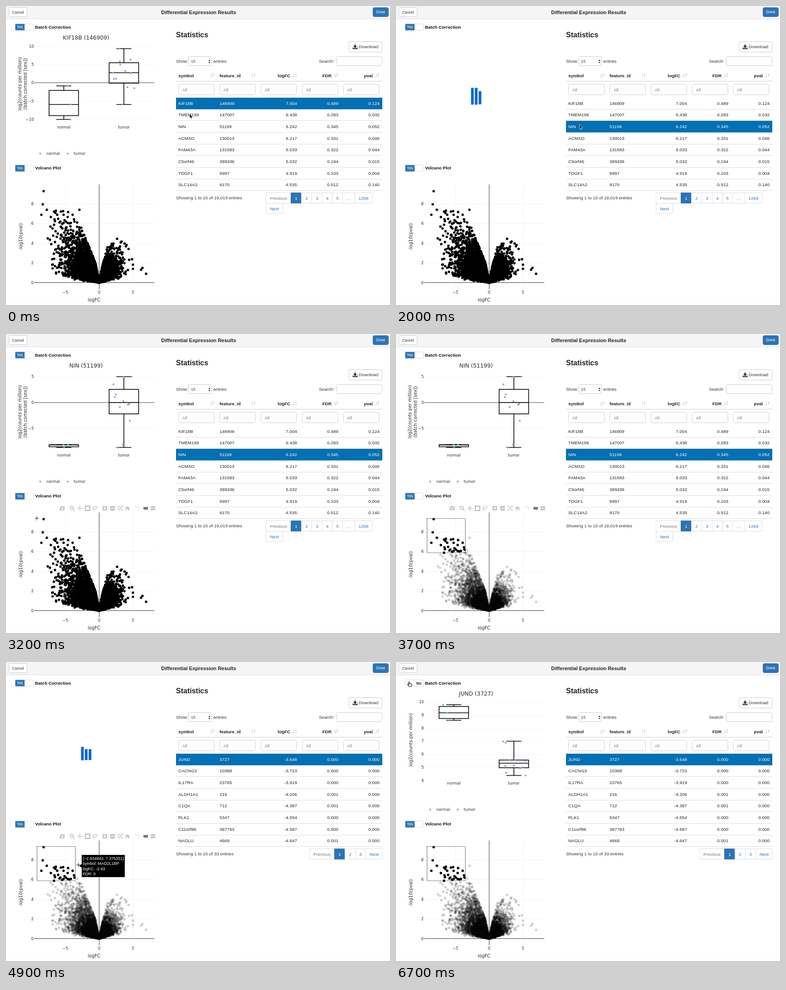
Animation, 847 px wide and 661 px high, one loop 7300 ms. Source, as an HTML page with a canvas:

```html
<!DOCTYPE html>
<html lang="en">
<head>
<meta charset="utf-8">
<title>Differential Expression Results</title>
<style>
html, body { margin: 0; width: 100%; height: 100%; overflow: hidden; background: #fff; }
canvas { display: block; }
</style>
</head>
<body>
<canvas id="stage" width="847" height="661"></canvas>
<script>
const LOOP = 7300, STEP = 100;
const UI = '"Liberation Sans", Arial, sans-serif', CHART = '"DejaVu Sans", Verdana, sans-serif';
const BLUE = '#2d74b5', GREEN = '#66c2a5', PURPLE = '#8da0cb', INK = '#333';
const stage = document.getElementById('stage');
let c = stage.getContext('2d');

// ---- drawing helpers; text is centred vertically on y
function text(s, x, y, size, { color = INK, align = 'left', bold = false, font = UI } = {}) {
  c.font = `${bold ? 'bold ' : ''}${size}px ${font}`;
  c.fillStyle = color;
  c.textAlign = align;
  c.fillText(s, x, y + size * 0.36);
}
const chart = (s, x, y, size = 8.5, align = 'center') =>
  text(s, x, y, size, { color: '#2a2a2a', align, font: CHART });
function upright(s, x, y) {
  c.save();
  c.translate(x, y);
  c.rotate(-Math.PI / 2);
  chart(s, 0, 0, 9.9);
  c.restore();
}
function rect(x, y, w, h, color) { c.fillStyle = color; c.fillRect(x, y, w, h); }
function line(points, color = '#000', width = 1) {
  c.strokeStyle = color;
  c.lineWidth = width;
  c.beginPath();
  points.forEach(([x, y]) => c.lineTo(x, y));
  c.stroke();
}
function shape(points, color) {
  c.fillStyle = color;
  c.beginPath();
  points.forEach(([x, y]) => c.lineTo(x, y));
  c.fill();
}
function dot(x, y, r, color) {
  c.fillStyle = color;
  c.beginPath();
  c.arc(x, y, r, 0, 7);
  c.fill();
}
function frame(x, y, w, h, { fill = '#fff', border = '#ccc', radius = 3 } = {}) {
  c.beginPath();
  c.roundRect(x + 0.5, y + 0.5, w - 1, h - 1, radius);
  c.fillStyle = fill;
  c.fill();
  c.strokeStyle = border;
  c.lineWidth = 1;
  c.stroke();
}
const pairs = a => a.flatMap((v, i) => i % 2 ? [] : [[v, a[i + 1]]]);

// ---- volcano points
let seed = 7;
const rnd = () => (seed = seed * 16807 % 2147483647) / 2147483647;
const gauss = () => Math.sqrt(-2 * Math.log(rnd())) * Math.cos(6.2832 * rnd());
function lobe(n, side, mean, top, spread, lean) {
  const out = [];
  while (out.length < n) {
    const h = -Math.log(rnd()) * mean;
    const fc = 0.27 * h + Math.abs(gauss()) * spread * (1 - Math.exp(-h / 0.45)) + Math.max(0, h - 2) * lean;
    if (h < top && fc < 7.2) out.push([205.5 + side * fc * 14.9, 609.5 - h * 21.7]);
  }
  return out;
}
const picks = pairs([83, 408, 81, 437, 78, 460, 90, 449, 99, 465, 106, 453, 110, 451, 109, 456, 121, 453,
  126, 452, 137, 454, 113, 460, 127, 460, 147, 460, 136, 465, 129, 472, 115, 469, 107, 470, 108, 474,
  106, 482, 118, 477, 124, 480, 120, 475, 127, 478, 132, 475, 136, 478, 140, 479, 143, 478, 150, 470, 151, 475]);
const strays = pairs([162, 449, 157, 477, 92, 512, 98, 486, 97, 515, 102, 558, 102, 570, 108, 520, 104, 506,
  309, 590, 301, 577, 298, 581, 278, 558, 280, 570, 280, 579, 245, 513, 255, 519, 253, 521, 236, 524]);
const cloud = [...lobe(3600, -1, 1.25, 5.8, 2.05, 0.3), ...lobe(2800, 1, 0.72, 4.1, 1.3, 0.15), ...strays];
function layer(points, color) {
  const sheet = document.createElement('canvas'), main = c;
  sheet.width = 847;
  sheet.height = 661;
  c = sheet.getContext('2d');
  points.forEach(([x, y]) => dot(x, y, 2.7, color));
  c = main;
  return sheet;
}
const solid = layer([...cloud, ...picks], '#000'), faded = layer([...cloud, ...picks], 'rgba(0,0,0,.19)');

// ---- box plots: ticks [first value, step, first y, spacing, count]; boxes [max, q3, median, q1, min]
const plots = {
  kif: { title: 'KIF18B (146909)', ticks: [10, -5, 88.5, 40.4, 5], zero: 169, labelX: [30, 42],
    normal: [176, 186, 217, 241.5, 250], tumor: [94, 125, 147, 170, 217],
    green: [136, 176, 142, 217, 142, 250],
    purple: [249.5, 94, 251, 122, 275, 118, 252, 129, 263, 143, 236, 147, 275, 148, 238, 161, 243, 160,
      268, 179, 283, 181, 256, 217] },
  nin: { title: 'NIN (51199)', ticks: [5, -5, 94, 57, 3], zero: 151, labelX: [30, 42],
    normal: [243.5, 244, 244.5, 248.5, 250], tumor: [94, 122, 151, 176, 250],
    green: [127, 244, 137, 244, 128, 250],
    purple: [259, 95, 277, 94, 237, 111, 242, 133, 240, 139, 259, 148, 272, 154, 269, 156, 251, 161,
      273, 191, 258, 244, 247, 250] },
  jund: { title: 'JUND (3727)', ticks: [10, -1, 91.5, 28.9, 6], labelX: [32, 44],
    normal: [94, 98, 112, 132, 138], tumor: [184, 216, 223, 242, 250],
    green: [130, 94, 108, 112, 141, 138],
    purple: [253, 184, 283, 188, 235, 216, 251, 217, 276, 216, 282, 216, 244, 228, 234, 239, 241, 244,
      252, 243, 281, 240, 268, 250] },
  raw: { title: 'JUND (3727)', ticks: [10, -1, 88, 28.8, 7], labelX: [32],
    normal: [94, 98, 112, 124.5, 128.5], tumor: [174.5, 216, 223, 233, 250],
    green: [104, 94, 113, 112, 118, 129],
    purple: [236, 175, 242, 178, 250, 216, 262, 216, 285, 218, 241, 229, 260, 228, 279, 232, 274, 234,
      243, 244, 286, 250] }
};
function box(x, [max, q3, med, q1, min]) {
  c.strokeStyle = '#000';
  c.lineWidth = 1.6;
  c.strokeRect(x - 32.5, q3, 65, q1 - q3);
  line([[x - 32.5, med], [x + 32.5, med]], '#000', 1.6);
  [[max, q3], [min, q1]].forEach(([tip, edge]) => {
    line([[x - 16.5, tip], [x + 16.5, tip]], '#000', 1.6);
    line([[x, tip], [x, edge]], '#000', 1.6);
  });
}
function boxPlot(p) {
  const [first, step, y0, gap, count] = p.ticks;
  for (let i = 0; i < count; i++) {
    const y = y0 + i * gap;
    if (y < 255) line([[62, Math.round(y) + 0.5], [327, Math.round(y) + 0.5]], '#f6f6f6');
    chart(String(first + i * step).replace('-', '−'), 61.5, y, 8.5, 'right');
  }
  if (p.zero) line([[62, p.zero], [327, p.zero]], '#444');
  chart(p.title, 176.5, 70, 12.2);
  upright('log2(counts per million)', p.labelX[0], 171.5);
  if (p.labelX[1]) upright('(batch corrected [sex])', p.labelX[1], 171.5);
  box(127.5, p.normal);
  box(260, p.tumor);
  pairs(p.green).forEach(([x, y]) => dot(x, y, 2.1, GREEN));
  pairs(p.purple).forEach(([x, y]) => dot(x, y, 2.1, PURPLE));
  chart('normal', 127.5, 267);
  chart('tumor', 260, 267);
  dot(75.5, 325, 2.1, GREEN);
  dot(136, 325, 2.1, PURPLE);
  chart('normal', 89, 325, 8.5, 'left');
  chart('tumor', 149.5, 325, 8.5, 'left');
}

// three pulsing bars, each trailing the one before it
function loader(x, y, t, phase) {
  for (let i = 0; i < 3; i++) {
    const p = (t / 1000 + phase + 1 - i * 0.16) % 1;
    const k = p < 0.8 ? (1 - Math.cos(p / 0.8 * 2 * Math.PI)) / 2 : 0;
    rect(x + i * 8.4, y - 13 * k, 6, 24 + 14.5 * k, '#0a68d8');
  }
}

// ---- page furniture
function toggle(y, on) {
  frame(20, y, 41, 15, { border: '#ddd', radius: 2 });
  if (on) {
    rect(20.5, y + 0.5, 20.5, 14, BLUE);
    text('Yes', 30.7, y + 7.5, 8.2, { color: '#fff', align: 'center' });
  } else text('No', 50.5, y + 7.5, 8.6, { align: 'center', color: '#222', bold: true });
}
function page(on) {
  rect(0, 0, 847, 661, '#fff');
  rect(0, 0, 847, 28, '#f5f5f5');
  rect(0, 28, 847, 1, '#ddd');
  rect(0, 660, 847, 1, '#888');
  frame(6, 3, 41, 21);
  text('Cancel', 26.5, 13.5, 8.4, { align: 'center' });
  frame(809, 3, 35, 21, { fill: BLUE, border: '#2a6ba6' });
  text('Done', 826.5, 13.5, 8.2, { color: '#fff', align: 'center' });
  text('Differential Expression Results', 425, 13.5, 11.2, { bold: true, align: 'center', color: '#222' });
  toggle(39, on);
  toggle(350, true);
  text('Batch Correction', 64, 46.5, 9.75, { bold: true, color: '#111' });
  text('Volcano Plot', 64, 356.5, 9.6, { bold: true, color: '#111' });
  text('Statistics', 375, 63, 16, { bold: true, color: '#222' });
  frame(756, 78, 74, 24);
  rect(768.5, 85, 3, 4, INK);
  shape([[765.5, 88.5], [774.5, 88.5], [770, 93]], INK);
  line([[765.5, 91.5], [765.5, 94], [774.5, 94], [774.5, 91.5]], INK, 1.8);
  text('Download', 778, 90, 9.7);
}

// ---- table
const columns = [['symbol', 380, 0], ['feature_id', 471, 0], ['logFC', 642, 1], ['FDR', 733, 1], ['pval', 824, 1]];
const allGenes = `KIF18B 146909 7.004 0.489 0.124
TMEM199 147007 6.438 0.283 0.032
NIN 51199 6.242 0.345 0.052
ACMSD 130013 6.217 0.331 0.046
FAM43A 131583 5.033 0.322 0.044
C5orf46 389336 5.032 0.194 0.015
TDGF1 6997 4.919 0.103 0.004
SLC14A2 8170 4.535 0.512 0.140`;
const pickedGenes = `JUND 3727 -3.648 0.000 0.000
CACNG3 10368 -3.723 0.000 0.000
IL17RA 23765 -3.919 0.000 0.000
ALDH1A1 216 -4.206 0.001 0.000
C1QA 712 -4.387 0.001 0.000
PLK1 5347 -4.554 0.000 0.000
C11orf96 387763 -4.587 0.000 0.000
NAGLU 4669 -4.647 0.001 0.000`;
function pager(x, y, cells) {
  cells.forEach(([label, w]) => {
    const active = label === '1', muted = label === 'Previous' || label === '…';
    frame(x, y, w + 1, 24, { fill: active ? BLUE : '#fff', border: active ? BLUE : '#ddd', radius: 0 });
    text(label, x + w / 2 + 0.5, y + 12, 9.8, { align: 'center', color: active ? '#fff' : muted ? '#777' : BLUE });
    x += w;
  });
}
function sortIcon(x) {
  line([[x - 2.5, 149], [x - 2.5, 157]], '#ccc');
  line([[x - 4.5, 154.5], [x - 2.5, 157], [x - 0.5, 154.5]], '#ccc');
  line([[x + 2.5, 149], [x + 2.5, 157]], '#ccc');
  line([[x + 0.5, 151.5], [x + 2.5, 149], [x + 4.5, 151.5]], '#ccc');
}
function table(rows, selected, picked) {
  text('Show', 375, 121.5, 9.8);
  frame(402, 111, 52, 21);
  text('15', 408, 122, 8.8);
  shape([[446.5, 121], [451, 121], [448.75, 118]], INK);
  shape([[446.5, 123], [451, 123], [448.75, 126]], INK);
  text('entries', 457, 121.5, 9.8);
  text('Search:', 724, 121.5, 9.8, { align: 'right' });
  frame(728, 111, 102, 21);
  columns.forEach(([name, x, right], i) => {
    text(name, right ? x - 15 : x, 153, 9.8, { bold: true, align: right ? 'right' : 'left', color: '#222' });
    sortIcon(455 + i * 91);
    frame(380 + i * 90.9, 172, 80, 24);
    text('All', 389 + i * 90.9, 184.5, 9.4, { color: '#777' });
  });
  rect(375, 165, 455, 1.5, '#ddd');
  rows.split('\n').forEach((row, r) => {
    const y = 214.3 + r * 25.65, on = r === selected;
    rect(375, Math.round(y + 12.4), 455, 1, '#ddd');
    if (on) rect(375, Math.round(y - 12.6), 455, 25.5, '#0270b2');
    row.split(' ').forEach((cell, i) => {
      const [, x, right] = columns[i];
      text(cell, x, y, 9.85, { align: right ? 'right' : 'left', color: on ? '#fff' : '#222' });
    });
  });
  text(`Showing 1 to 15 of ${picked ? '33' : '19,019'} entries`, 375, 422.5, 9.8);
  if (picked) pager(669, 411, [['Previous', 55], ['1', 23], ['2', 23], ['3', 23], ['Next', 37]]);
  else {
    pager(573, 411, [['Previous', 55], ['1', 23], ['2', 23], ['3', 23], ['4', 22.5], ['5', 22.5], ['…', 27], ['1268', 38]]);
    pager(573, 434, [['Next', 37]]);
  }
}

// ---- volcano plot, with an optional selection [right, bottom]
function volcano(sel) {
  [131, 280].forEach(x => line([[x + 0.5, 393], [x + 0.5, 622]], '#f3f3f3'));
  [436, 479, 523, 566].forEach(y => line([[62, y + 0.5], [327, y + 0.5]], '#f3f3f3'));
  line([[205.5, 393], [205.5, 624]], '#333');
  line([[62, 609.5], [327, 609.5]], '#333');
  c.drawImage(sel ? faded : solid, 0, 0);
  if (sel) {
    picks.filter(([x, y]) => x <= sel[0] && y <= sel[1]).forEach(([x, y]) => dot(x, y, 2.7, '#000'));
    c.setLineDash([1.5, 1.5]);
    c.lineWidth = 1.2;
    c.strokeStyle = '#000';
    c.strokeRect(68.5, 406.5, sel[0] - 68.5, sel[1] - 406.5);
    c.setLineDash([]);
  }
  [0, 2, 4, 6, 8].forEach(v => chart(v, 61, 609.5 - v * 21.7, 8.5, 'right'));
  [['−5', 131], ['0', 205.5], ['5', 280]].forEach(([s, x]) => chart(s, x, 631));
  chart('logFC', 194, 647, 9.9);
  upright('-log10(pval)', 32, 508.5);
}

function modebar(y) {
  const g = '#c6c6c6', d = '#777';
  rect(118.5, y - 3.5, 11, 8, g);
  rect(121.5, y - 5, 5, 2, g);
  dot(124, y + 0.5, 2.4, '#fff');
  dot(124, y + 0.5, 1.2, g);
  c.strokeStyle = g;
  c.lineWidth = 1.8;
  c.beginPath();
  c.arc(145, y - 1, 3.7, 0, 7);
  c.stroke();
  line([[147.5, y + 1.5], [151.5, y + 5.5]], g, 2);
  line([[143, y - 1], [147, y - 1]], g);
  line([[158, y], [168, y]], g, 1.3);
  line([[163, y - 5], [163, y + 5]], g, 1.3);
  [0, 1, 2, 3].forEach(i => {
    c.save();
    c.translate(163, y);
    c.rotate(i * Math.PI / 2);
    shape([[-2, -3.5], [2, -3.5], [0, -6]], g);
    c.restore();
  });
  c.strokeStyle = d;
  c.lineWidth = 1.7;
  c.setLineDash([2, 1.2]);
  c.strokeRect(174.8, y - 4.7, 10, 9.5);
  c.setLineDash([]);
  c.strokeStyle = g;
  c.lineWidth = 1.4;
  c.beginPath();
  c.ellipse(196.5, y - 1.5, 4.8, 3, -0.2, 0, 7);
  c.stroke();
  line([[193, y + 1], [194, y + 3], [192, y + 5]], g, 1.4);
  [218, 235].forEach(x => {
    rect(x - 5, y - 5, 10, 10, g);
    line([[x - 3, y], [x + 3, y]], '#fff', 1.6);
  });
  line([[218, y - 3], [218, y + 3]], '#fff', 1.6);
  line([[248, y - 4], [256, y + 4]], g, 1.2);
  line([[248, y + 4], [256, y - 4]], g, 1.2);
  [-1, 1].forEach(a => [-1, 1].forEach(b =>
    line([[252 + a * 2, y + b * 5], [252 + a * 5, y + b * 5], [252 + a * 5, y + b * 2]], g, 1.2)));
  shape([[262.5, y], [268, y - 5], [273.5, y], [272, y], [272, y + 4.5], [269.5, y + 4.5], [269.5, y + 1],
    [266.5, y + 1], [266.5, y + 4.5], [264, y + 4.5], [264, y]], g);
  c.setLineDash([1.5, 1.5]);
  line([[285, y - 3.5], [292, y - 3.5], [292, y + 5]], g, 1.4);
  c.setLineDash([]);
  shape([[302, y], [305, y - 3], [313, y - 3], [313, y + 3], [305, y + 3]], d);
  [-2.5, 2.5].forEach(k => shape([[318, y + k], [320, y + k - 2], [329, y + k - 2], [329, y + k + 2], [320, y + k + 2]], g));
}

// ---- tooltips
function pointTip(x, y, tipX, tipY, lines) {
  rect(x, y, 95, 49, '#000');
  shape([[tipX, tipY], [x, tipY - 4], [x, tipY + 4]], '#000');
  lines.forEach((s, i) => text(s, x + 2, y + 7.3 + i * 11.5, 9, { color: '#fff' }));
}
function boxTips() {
  [['max: 9.90457', 94], ['q3: 9.749291', 98], ['median: 9.283441', 112], ['q1: 8.59811', 132], ['min: 8.369666', 138]]
    .forEach(([s, tipY], i) => {
      const y = 86 + i * 14.5, label = `(normal, ${s})`;
      c.font = `9px ${UI}`;
      rect(165, y - 6.5, c.measureText(label).width + 4, 13, '#000');
      shape([[160.5, tipY], [165, y - 3], [165, y + 3]], '#000');
      text(label, 167, y, 9, { color: '#fff' });
    });
  text('white', 281, 115, 9, { color: '#000' });
}

// ---- pointer: [start, end, x, y] legs, eased
const legs = [[900, 1500, 405, 261], [2600, 3100, 68, 406], [3200, 3700, 153, 482], [4100, 4600, 159.5, 447],
  [5100, 5600, 62, 94], [5800, 6200, 28, 44]];
function pointerAt(t) {
  let x = 405, y = 237.5;
  for (const [a, b, nx, ny] of legs) {
    const k = Math.min(1, Math.max(0, (t - a) / (b - a))), e = k * k * (3 - 2 * k);
    x += (nx - x) * e;
    y += (ny - y) * e;
  }
  return [x, y];
}
function outline(points) {
  shape(points, '#111');
  c.lineJoin = 'round';
  line([...points, points[0]], '#fff', 0.8);
  c.lineJoin = 'miter';
}
function pointer(x, y, kind) {
  if (kind === 'cross') {
    line([[x - 4.5, y], [x + 4.5, y]], '#222');
    line([[x, y - 4.5], [x, y + 4.5]], '#222');
    return;
  }
  c.save();
  c.translate(x, y);
  if (kind === 'arrow')
    outline([[0, 0], [0, 10], [2.3, 8], [4, 11.5], [5.8, 10.6], [4.2, 7.3], [7, 7]]);
  else {
    c.beginPath();
    [[0, 0], [1.8, 0], [2, 4], [4, 3.6], [6, 4.4], [7, 6], [6.3, 10], [1, 10], [-2.5, 5.5], [-1.5, 4.8], [0, 6]]
      .forEach(([px, py]) => c.lineTo(px, py));
    c.closePath();
    c.fillStyle = '#fff';
    c.fill();
    c.strokeStyle = '#111';
    c.lineWidth = 1.1;
    c.stroke();
  }
  c.restore();
}

function draw(t) {
  const [x, y] = pointerAt(t);
  const inVolcano = x < 330 && y > 375, inBox = x < 330 && y > 60 && y < 340 && t > 5300;
  const between = (a, b) => t >= a && t < b;
  page(t < 6300);

  if (t < 1700) boxPlot(plots.kif);
  else if (t < 2500) loader(165.5, 192, t, 0.48);
  else if (t < 3800) boxPlot(plots.nin);
  else if (t < 5300) loader(165.5, 192, t, t < 4500 ? 0.56 : 0.27);
  else if (t < 6400) boxPlot(plots.jund);
  else if (t < 6600) loader(165.5, 192, t, 0.6);
  else boxPlot(plots.raw);

  if (t < 3800) table(allGenes, t < 1500 ? 0 : 2, false);
  else if (t < 4500) loader(591.8, 238.5, t, 0.56);
  else table(pickedGenes, 0, true);

  volcano(t < 3300 ? null : t < 3700 ? [x, y] : [153, 482]);
  if (inVolcano) modebar(384);
  if (inBox) modebar(73.5);
  if (between(3800, 4400))
    pointTip(160, 460, 154, 484, ['(−3.390328, 5.780721)', 'symbol: ZNF443', 'logFC: -3.39', 'FDR: 0']);
  if (between(4500, 5200))
    pointTip(167, 425, 162, 449, ['(−2.934943, 7.375351)', 'symbol: MAD2L1BP', 'logFC: -2.93', 'FDR: 0']);
  if (between(5600, 6000)) boxTips();
  pointer(x, y, inVolcano || inBox ? 'cross' : t >= 6100 ? 'hand' : 'arrow');
}

function tick() {
  const t = performance.now() % LOOP;
  draw(Math.floor(t / STEP) * STEP);
  requestAnimationFrame(tick);
}
tick();
</script>
</body>
</html>
```
